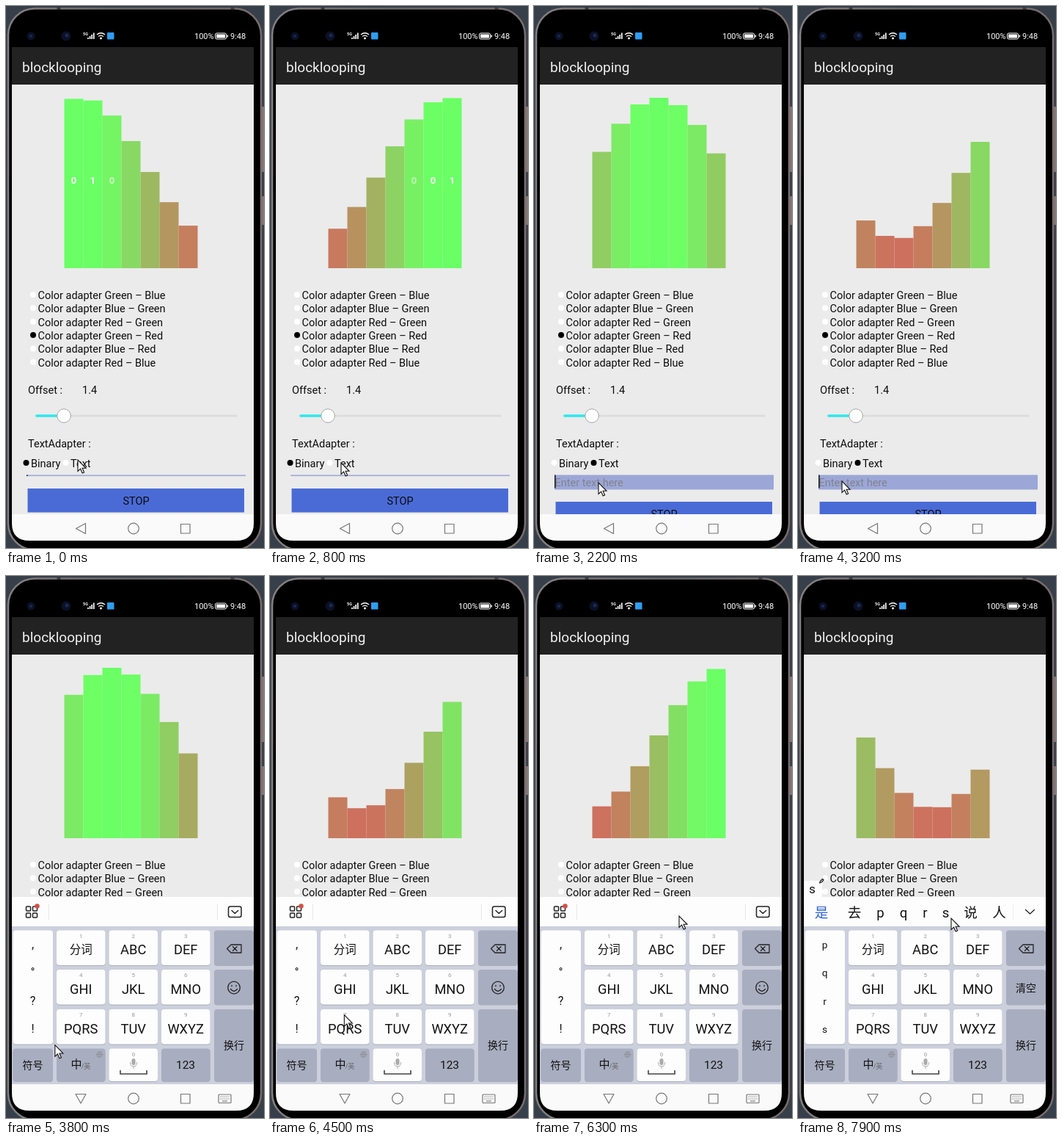
Write an HTML page that moves like this. It is 352x738 px and loops after 8000 ms.

```html
<!DOCTYPE html>
<html lang="en">
<head>
<meta charset="utf-8">
<title>Wave loader demo</title>
<style>
  html, body { margin: 0; width: 100%; height: 100%; overflow: hidden; background: #363f4a; }
  svg { display: block; width: 352px; height: 738px; }
  text { font: 14.5px Roboto, "Noto Sans CJK SC", "Noto Sans CJK", sans-serif; fill: #0c0c0c; }
  .mid { text-anchor: middle; }
  .line { fill: none; stroke: #222; stroke-width: 1.3; stroke-linejoin: round; stroke-linecap: round; }
  .nav { fill: none; stroke: #777; stroke-width: 1.2; stroke-linejoin: round; }
  .digit { font-weight: bold; font-size: 13px; fill: #fff; }
</style>
</head>
<body>
<svg viewBox="0 0 352 738">
  <defs>
    <clipPath id="pageClip"><rect x="8" y="107" width="330" height="585"/></clipPath>
    <clipPath id="boardClip"><rect x="8" y="400" width="330" height="292"/></clipPath>
    <linearGradient id="edge" x2="1" y2="0">
      <stop offset="0" stop-color="#85807f"/><stop offset=".5" stop-color="#6d6a6c"/><stop offset="1" stop-color="#7a6d6b"/>
    </linearGradient>
  </defs>

  <!-- phone body -->
  <rect x="348" y="137" width="4" height="89" fill="#83777a"/>
  <rect x="348" y="259" width="4" height="39" fill="#83777a"/>
  <rect x="3" y="3.5" width="345" height="737" rx="36" fill="#000" stroke="url(#edge)" stroke-width="2.5"/>
  <path d="M72 2v3M309 2v3" stroke="#3a3a3e" stroke-width="5"/>

  <!-- status bar -->
  <g fill="#0b1124">
    <circle cx="34" cy="41" r="5.5"/><circle cx="82" cy="41" r="6.5"/>
    <g fill="#1a2a58"><circle cx="34" cy="41" r="2"/><circle cx="83" cy="40" r="2.5"/></g>
  </g>
  <text x="105" y="40" style="font-size:5.5px;font-weight:bold;fill:#fff">5G</text>
  <path d="M112 45v-2M114.6 45v-4M117.2 45v-6M119.8 45v-8.500" stroke="#fff" stroke-width="1.7"/>
  <g fill="none" stroke="#fff" stroke-width="1.3">
    <path d="M124 39q5.500-4.500 11 0M126 41.500q3.500-2.800 7 0"/><circle cx="129.500" cy="44" r=".8"/>
    <rect x="285.500" y="37" width="15" height="8" rx="2" stroke-width="1"/>
  </g>
  <rect x="138" y="36" width="9.500" height="9.500" rx="1" fill="#2f9df0"/>
  <rect x="287" y="38.500" width="12" height="5" fill="#fff"/>
  <rect x="301.500" y="39.500" width="1.500" height="3" fill="#fff"/>
  <text x="257" y="45" style="font-size:11px;fill:#fff">100%</text>
  <text x="306" y="45" style="font-size:11px;fill:#fff">9:48</text>

  <!-- app bar -->
  <rect x="8" y="56" width="330" height="51" fill="#222"/>
  <text x="22" y="89.500" style="font-size:19px;fill:#f0f0f0">blocklooping</text>

  <!-- page -->
  <g clip-path="url(#pageClip)">
    <rect x="8" y="107" width="330" height="585" fill="#ebebeb"/>
    <g id="bars"></g>
    <g id="options"></g>
    <text x="30" y="527.500">Offset :</text>
    <text x="104" y="527.500">1.4</text>
    <path d="M41 558H314" stroke="#dcdcdc" stroke-width="3" stroke-linecap="round"/>
    <path d="M42 558H72" stroke="#2ee9f0" stroke-width="3.500" stroke-linecap="round"/>
    <circle cx="79" cy="558" r="9.300" fill="#fff" stroke="#a5a5a5"/>
    <text x="30" y="601">TextAdapter :</text>
    <circle id="binaryDot" cx="27.500" cy="622" r="4"/>
    <text x="34" y="628">Binary</text>
    <circle id="textDot" cx="81.500" cy="622" r="4"/>
    <text x="88" y="628">Text</text>
    <rect id="field" x="28" y="638.500" width="299" fill="#9ca7d7"/>
    <text id="hint" x="28.500" y="654" style="fill:#80828f">Enter text here</text>
    <rect id="caret" x="28" y="638.500" width="1.500" fill="#111"/>
    <g id="stop">
      <rect x="29.500" y="657" width="295.500" height="32.500" fill="#4a6bd6"/>
      <text x="177.500" y="679" class="mid">STOP</text>
    </g>
  </g>

  <!-- keyboard -->
  <g clip-path="url(#boardClip)">
    <g id="board">
      <rect x="8" y="437" width="330" height="255" fill="#cccfdc"/>
      <rect x="8" y="437" width="330" height="40" fill="#fdfdfd"/>
      <g id="keys"></g>
      <path class="line" d="M307 502h14v11h-14l-5.500-5.500zM309.500 504.800l5.500 5.500m0-5.500l-5.500 5.500"/>
      <g class="line" style="stroke:#888;stroke-width:.7">
        <circle cx="127.500" cy="651.500" r="3.800"/><path d="M123.700 651.500h7.600M127.500 647.700q-3 3.800 0 7.600q3-3.800 0-7.600"/>
      </g>
      <g fill="none" stroke="#aaa"><path d="M169.500 662q0 6 4.500 6t4.500-6M174 668v3"/></g>
      <rect x="171.500" y="657" width="5" height="9" rx="2.500" fill="#aaa"/>
      <path d="M156 673v5h36v-5" fill="none" stroke="#444" stroke-width="1.600"/>
      <g id="idle">
        <path d="M58.500 447v21M288.500 447v21" stroke="#e6e6e6"/>
        <g class="line" style="stroke-width:1.500">
          <rect x="27.500" y="450" width="6" height="6" rx="1"/><rect x="36.500" y="450" width="6" height="6" rx="1"/>
          <rect x="27.500" y="459" width="6" height="6" rx="1"/><rect x="36.500" y="459" width="6" height="6" rx="1"/>
          <rect x="303.500" y="450" width="17.500" height="14.500" rx="2.500"/><path d="M308 455.500l4.300 4 4.300-4"/>
        </g>
        <circle cx="42.500" cy="449.500" r="3.200" fill="#d65046"/>
        <g class="line"><circle cx="311" cy="560.500" r="8.300"/><path d="M306.500 562.500q4.500 5.500 9 0M308 557.500v1M314 557.500v1"/></g>
      </g>
      <g id="typed">
        <rect x="8" y="415" width="25" height="22" fill="#fdfdfd"/>
        <text x="19.500" y="432" class="mid" style="font-size:17px">s</text>
        <path class="line" d="M29.500 418l1-2.500 3-3 1.500 1.500-3 3z"/>
        <path d="M293.500 447v21" stroke="#eee"/>
        <path class="line" d="M310.500 454.500l6 5.500 6-5.500"/>
      </g>
    </g>
  </g>

  <!-- navigation bar -->
  <path d="M8 692H338V704Q338 728 314 728H32Q8 728 8 704Z" fill="#fafafa"/>
  <path id="back" class="nav" d="M95.500 711.500l13-7v14z"/>
  <path id="down" class="nav" d="M95 705.500h14l-7 12.500z"/>
  <circle class="nav" cx="174" cy="711.500" r="7.300"/>
  <rect class="nav" x="238.500" y="705.500" width="12.500" height="12.500"/>
  <g id="navKeys">
    <rect class="nav" x="290" y="706" width="17" height="11.500" rx="1"/>
    <path class="nav" d="M292.500 709h12M292.500 712h12" stroke-dasharray="1.500 1.200"/><path class="nav" d="M295 715h7"/>
  </g>

  <path id="mouse" d="M0 0V15.500L3.600 12.200 6.200 18 8.600 17 6.100 11.300H11Z" fill="#fff" stroke="#111" stroke-width="1.100"/>
</svg>

<script>
const $ = id => document.getElementById(id);
const svgNS = 'http://www.w3.org/2000/svg';

function add(parent, tag, attrs, content) {
  const el = document.createElementNS(svgNS, tag);
  for (const k in attrs) el.setAttribute(k, attrs[k]);
  if (content) el.textContent = content;
  return parent.appendChild(el);
}
function label(parent, x, y, size, content, fill = '#111') {
  return add(parent, 'text', { x, y: y + size * 0.36, class: 'mid', style: `font-size:${size}px;fill:${fill}` }, content);
}
const show = (id, on) => { $(id).style.display = on ? '' : 'none'; };

// Bars
const BARS = 7, STEP = Math.PI / BARS, DIGITS = '0100001';
const bars = [...DIGITS].map((d, i) => ({
  rect: add($('bars'), 'rect', { x: 79.5 + 26 * i, width: 26 }),
  digit: add($('bars'), 'text', { x: 92.5 + 26 * i, y: 241.5, class: 'mid digit' }, d)
}));

// Colour options
['Green – Blue', 'Blue – Green', 'Red – Green', 'Green – Red', 'Blue – Red', 'Red – Blue'].forEach((name, i) => {
  const y = 393 + 18.35 * i;
  add($('options'), 'circle', { cx: 37, cy: y, r: 4, fill: i === 3 ? '#000' : '#fff' });
  add($('options'), 'text', { x: 43.5, y: y + 6 }, 'Color adapter ' + name);
});

// Keyboard
const WHITE = '#fdfdfd', GREY = '#a8adbf';
function key(x, y, w, h, fill) {
  add($('keys'), 'rect', { x, y: y + 1, width: w, height: h, rx: 4, fill: '#a9adba' });
  add($('keys'), 'rect', { x, y, width: w, height: h, rx: 4, fill });
}
const cols = [69, 140.5, 212], rows = [482.5, 536, 590];
key(9.5, 482.5, 54.5, 155, WHITE);
['分词', 'ABC', 'DEF', 'GHI', 'JKL', 'MNO', 'PQRS', 'TUV', 'WXYZ'].forEach((name, i) => {
  const x = cols[i % 3], y = rows[Math.floor(i / 3)];
  key(x, y, 66.5, 47.5, WHITE);
  label($('keys'), x + 33.2, y + 7.5, 8, String(i + 1), '#999');
  label($('keys'), x + 33.2, y + 26, i ? 18.3 : 15.5, name);
});
key(284, 482.5, 54, 47.5, GREY);
key(284, 536, 54, 47.5, GREY);
key(284, 590, 54, 98, GREY);
key(9.5, 643.5, 54.5, 44.5, GREY);
cols.forEach((x, i) => key(x, 643.5, 66.5, 44.5, i === 1 ? WHITE : GREY));
label($('keys'), 311, 639, 14, '换行');
label($('keys'), 36.5, 666, 14, '符号');
label($('keys'), 96, 665, 15, '中');
label($('keys'), 109, 668, 9, '/英', '#666');
label($('keys'), 174, 651, 8, '0', '#999');
label($('keys'), 245, 665.5, 15.5, '123');
[...',°?!'].forEach((c, i) => label($('idle'), 36.5, 501 + 38.5 * i, 16, c));
[...'pqrs'].forEach((c, i) => label($('typed'), 36.5, 502 + 38.5 * i, 13.5, c));
label($('typed'), 311, 561, 14, '清空');
const candX = [32, 77, 112.5, 144, 173.5, 201.5, 235.5, 274.5];
[...'是去pqrs说人'].forEach((c, i) => label($('typed'), candX[i], 458, 18.5, c, i ? '#111' : '#2b62cf'));

// Timeline: [ms, values...]
const phaseKeys = [[0, -0.172], [800, 3.683], [2200, 11.231], [3200, 14.97], [4500, 21.412], [6300, 28.54], [7900, 32.975]];
const mouseKeys = [
  [0, 98, 618], [800, 97, 622], [1300, 97, 622], [1800, 88, 649], [2400, 88, 649], [3000, 60, 647], [3700, 60, 647],
  [4300, 101, 597], [4900, 102, 599], [5800, 198, 463], [6400, 198, 463], [7000, 103, 600], [7300, 103, 600], [7800, 209, 466]
];
const boardKeys = [[3500, 255], [3800, 0]];

function at(keys, t) {
  const n = keys.findIndex(k => k[0] > t);
  if (n === 0) return keys[0].slice(1);
  if (n < 0) return keys[keys.length - 1].slice(1);
  const a = keys[n - 1], b = keys[n], p = (t - a[0]) / (b[0] - a[0]);
  return a.slice(1).map((v, i) => v + (b[i + 1] - v) * p);
}

function draw(t) {
  const [phase] = at(phaseKeys, t);
  const textMode = t >= 1200;
  bars.forEach((bar, i) => {
    const c = Math.cos(phase + i * STEP), h = 136 + 96 * c;
    bar.rect.setAttribute('y', 357 - h);
    bar.rect.setAttribute('height', h);
    bar.rect.setAttribute('fill', `rgb(${156 - 51 * c | 0},${Math.min(255, 188 + 76 * c) | 0},${98 + 4 * c | 0})`);
    bar.digit.setAttribute('opacity', textMode ? 0 : Math.max(0, Math.min(1, (c - 0.48) / 0.42)));
  });

  $('binaryDot').setAttribute('fill', textMode ? '#fff' : '#000');
  $('textDot').setAttribute('fill', textMode ? '#000' : '#fff');
  $('field').setAttribute('height', textMode ? 20 : 1.6);
  $('caret').setAttribute('height', textMode ? 18 : 1.6);
  $('stop').setAttribute('transform', `translate(0 ${textMode ? 18 : 0})`);
  show('hint', textMode);
  show('caret', t % 1000 < 500);

  const open = t > 3500, typed = (t >= 4800 && t < 6200) || t >= 7300;
  show('board', open);
  show('down', open);
  show('navKeys', open);
  show('back', !open);
  show('typed', typed);
  show('idle', !typed);
  $('board').setAttribute('transform', `translate(0 ${at(boardKeys, t)[0]})`);
  $('mouse').setAttribute('transform', `translate(${at(mouseKeys, t).join(' ')})`);
}

const LOOP = 8000, TICK = 100, start = performance.now();
function frame() {
  const t = (performance.now() - start) % LOOP;
  draw(Math.floor(t / TICK) * TICK);
  requestAnimationFrame(frame);
}
frame();
</script>
</body>
</html>
```
